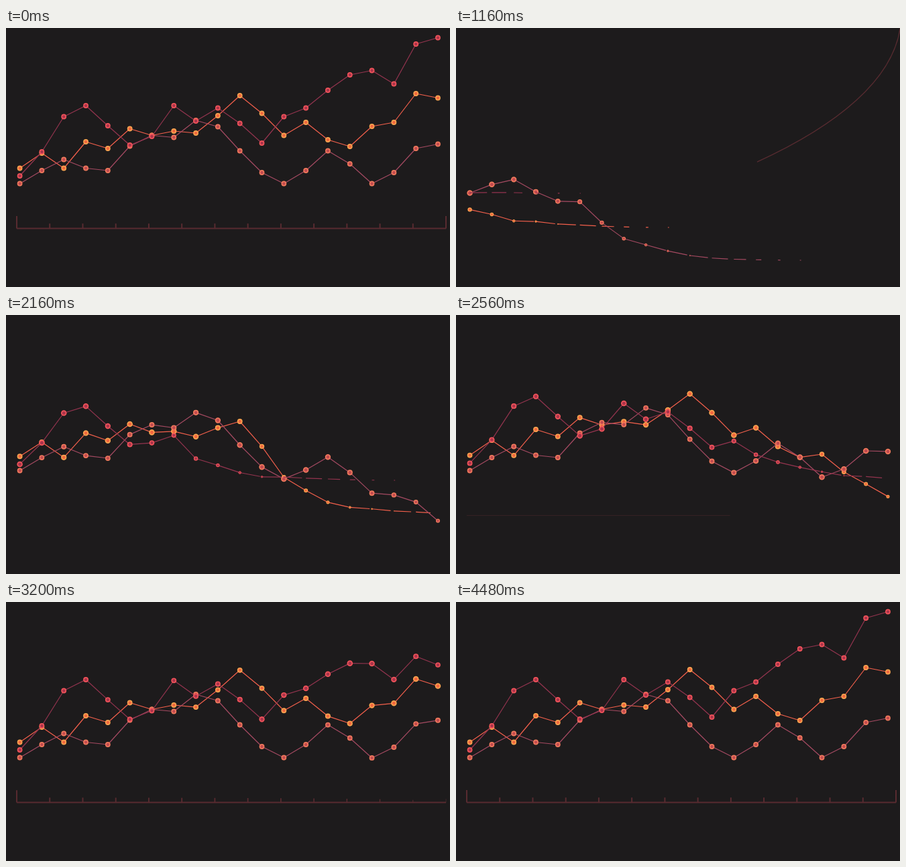
An HTML page with a canvas that plays this animation: 662x387 px, repeating every 5520 ms.

```html
<!DOCTYPE html>
<html lang="en">
<head>
<meta charset="utf-8">
<title>Line chart</title>
<style>
  html, body { margin: 0; width: 100%; height: 100%; overflow: hidden; background: #1d1b1c; }
  canvas { display: block; }
</style>
</head>
<body>
<canvas id="stage" width="662" height="387"></canvas>
<script>
const ctx = document.getElementById('stage').getContext('2d');
const LOOP = 5520, STEP = 40, DONE = 4480;
const STAGGER = 80, X0 = 20.6, GAP = 32.81;
const AXIS = { left: 16, right: 656, y: 299.6, ticks: 13, color: '#582b30' };

const series = [
  { start: 432, base: 298, line: '#f5604c', fill: '#f4663f', ring: '#fba550',
    ys: [209.5, 187, 209.5, 170, 180, 150.5, 160.5, 154, 157, 131,
         101, 127.5, 160.5, 141, 167, 177, 147, 141, 98, 104.5] },
  { start: -48, base: 347, line: '#a64a62', fill: '#c24a50', ring: '#f07a5c',
    ys: [232.5, 213, 196.5, 209.5, 213, 176.5, 160.5, 163.5, 138, 147.5,
         183.5, 216, 232.5, 213, 183.5, 203, 232.5, 216, 180, 173.5] },
  { start: 792, base: 247, line: '#95344f', fill: '#ab344b', ring: '#f2545a',
    ys: [221, 185, 132.5, 116, 146, 175, 162, 116, 139, 119.5,
         142.5, 172, 132.5, 119.5, 93, 70, 63.5, 83.5, 24, 14.5] }
];

const clamp = v => Math.max(0, Math.min(1, v));

// Equivalent to cubic-bezier(.64, 0, 0, 1)
function ease(x) {
  if (x <= 0) return 0;
  if (x >= 1) return 1;
  let lo = 0, hi = 1;
  for (let k = 0; k < 22; k++) {
    const s = (lo + hi) / 2;
    if (1.92 * (1 - s) ** 2 * s + s ** 3 < x) lo = s; else hi = s;
  }
  return lo * lo * (3 - 2 * lo);
}

const progress = (t, start, duration) => ease((t - start) / duration);

function backOut(x) {
  const u = clamp(x) - 1;
  return 1 + 2.7 * u ** 3 + 1.7 * u * u;
}

function stroke(color, width, ...points) {
  ctx.strokeStyle = color;
  ctx.lineWidth = width;
  ctx.beginPath();
  for (const [x, y] of points) ctx.lineTo(x, y);
  ctx.stroke();
}

function drawSeries({ start, base, line, fill, ring, ys }, t) {
  const age = i => t - start - i * STAGGER;
  const points = ys.map((y, i) => [X0 + i * GAP, base + (y - base) * ease(age(i) / 2200)]);

  points.slice(0, -1).forEach(([x, y], i) => {
    const [nextX, nextY] = points[i + 1];
    const grown = ease((age(i) + 272) / 1384);
    if (grown < 0.03) return;
    stroke(line, 1.2, [x, y], [x + (nextX - x) * grown, y + (nextY - y) * grown]);
  });

  points.forEach(([x, y], i) => {
    const scale = backOut((age(i) - 320) / 1600);
    if (scale <= 0) return;
    ctx.beginPath();
    ctx.arc(x, y, 3.1 * scale, 0, 2 * Math.PI);
    ctx.fillStyle = fill;
    ctx.fill();
    ctx.strokeStyle = ring;
    ctx.lineWidth = 1.6 * scale;
    ctx.stroke();
  });
}

function drawAxis(t) {
  const { left, right, y, ticks, color } = AXIS;
  const length = progress(t, 2170, 1000);
  const width = 2 * progress(t, 2250, 1000);
  if (width > 0) stroke(color, width, [left, y], [left + (right - left) * length, y]);

  for (let j = 0; j <= ticks; j++) {
    const grown = progress(t, 2350 + j * 40, 1000);
    if (grown < 0.03) continue;
    const x = left + j * (right - left) / ticks;
    const height = j % ticks ? 7.4 : 18.6;
    stroke(color, 2 * grown, [x, y], [x, y - height * grown]);
  }
}

const swoosh = new Path2D('M663,-6 C655,75 570,145 447,201 S160,285 16,299');
const SWOOSH_LENGTH = 756;

function drawSwoosh(t) {
  if (t < 810 || t > 1720) return;
  const head = SWOOSH_LENGTH * progress(t, 810, 1000);
  const tail = SWOOSH_LENGTH * progress(t, 1100, 800);
  ctx.strokeStyle = AXIS.color;
  ctx.lineWidth = 1.3;
  ctx.setLineDash([head - tail, 2 * SWOOSH_LENGTH]);
  ctx.lineDashOffset = -tail;
  ctx.stroke(swoosh);
  ctx.setLineDash([]);
}

function draw(now) {
  let t = Math.floor((now % LOOP) / STEP) * STEP;
  if (t < STEP || t >= DONE) t = LOOP;
  ctx.fillStyle = '#1d1b1c';
  ctx.fillRect(0, 0, 662, 387);
  drawSwoosh(t);
  drawAxis(t);
  for (const s of series) drawSeries(s, t);
}

let origin;
function tick(now) {
  origin ??= now;
  draw(now - origin);
  requestAnimationFrame(tick);
}
draw(0);
requestAnimationFrame(tick);
</script>
</body>
</html>
```
